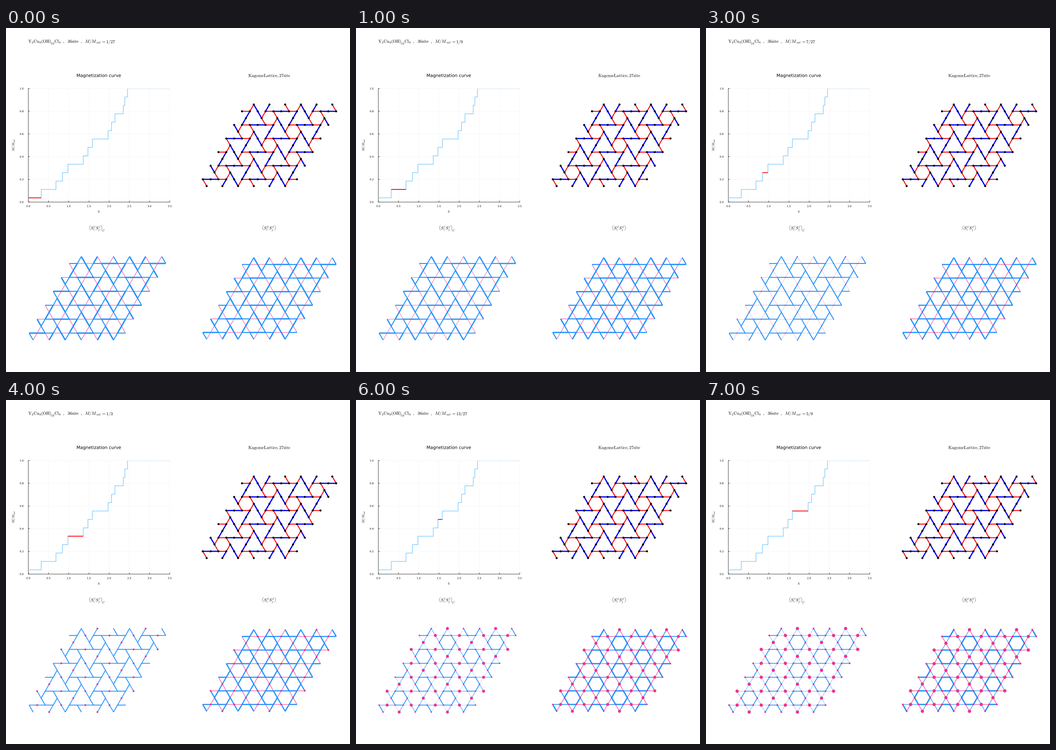
Recreate the animation shown at these times as a matplotlib script. Size 748 by 748 pixels, loop 8 s.

```python
import math
import numpy as np
import matplotlib.pyplot as plt
from matplotlib.animation import FuncAnimation
from matplotlib.collections import LineCollection
from matplotlib.patches import PathPatch, Rectangle
from matplotlib.textpath import TextPath
from matplotlib.transforms import Affine2D

SIZE, DPI = 748, 64
PT = 72 / DPI  # points per pixel
BLUE, PINK = "#1e90ff", "#f0328c"
plt.rcParams["mathtext.fontset"] = "cm"
plt.rcParams["font.family"] = "DejaVu Sans"

fig = plt.figure(figsize=(SIZE / DPI, SIZE / DPI), dpi=DPI, facecolor="white")
ax = fig.add_axes([0, 0, 1, 1])
ax.set_xlim(0, SIZE)
ax.set_ylim(SIZE, 0)
ax.axis("off")


def outline(x, y, s, size=9.5, align=0, turn=0):
    """Text outline; align is 0 left, 0.5 centre, 1 right of x."""
    path = TextPath((0, 0), s, size=size)
    box = path.get_extents()
    shift = -(box.x0 + align * box.width) if align else 0
    place = Affine2D().translate(shift, 0).scale(1, -1).rotate_deg(turn)
    return path.transformed(place.translate(x, y))


def label(*args, **kw):
    patch = PathPatch(outline(*args, **kw), fc="black", lw=0)
    return ax.add_patch(patch)


def line(xs, ys, color, width, **kw):
    return ax.plot(xs, ys, color=color, lw=width * PT, snap=False, **kw)[0]


def lattice():
    """Kagome sites and bonds in units of the bond length, y in half rows.

    Sites are sorted into "bridge" and "ring", bonds into "strong"
    (straight through a bridge site), "hex" (ring to ring) and "weak".
    """
    row = {(j, m): (j + m, 2 * j) for j in range(6) for m in range(13)}
    tip = {(j, k): (0.5 + j + 2 * k, 2 * j - 1) for j in range(7) for k in range(6)}
    sites = {"bridge": [], "ring": []}
    bonds = {"strong": [], "hex": [], "weak": []}
    bridge = {}
    for (j, m), p in row.items():
        if (m + j) % 3 == 1:
            bridge[p] = "\\" if m % 2 == 0 else "-"
    for (j, k), p in tip.items():
        if (k - j) % 3 == 1:
            bridge[p] = "/"
    for p in [*row.values(), *tip.values()]:
        sites["bridge" if p in bridge else "ring"].append(p)

    def add(a, b, way):
        ways = [bridge[p] for p in (a, b) if p in bridge]
        kind = "hex" if not ways else "strong" if way in ways else "weak"
        bonds[kind].append((a, b))

    for (j, m), p in row.items():
        if m < 12:
            add(p, row[j, m + 1], "-")
    for j in range(6):
        for k in range(6):
            low, high = tip[j, k], tip[j + 1, k]
            add(low, row[j, 2 * k], "\\")
            add(low, row[j, 2 * k + 1], "/")
            add(high, row[j, 2 * k + 1], "/")
            add(high, row[j, 2 * k + 2], "\\")
    return sites, bonds


SITES, BONDS = lattice()


class Panel:
    def __init__(self, x, y, step):
        scale = np.array([step, -step * math.sqrt(3) / 2])

        def place(points):
            return np.array([x, y]) + scale * np.array(points)

        self.lines, self.dots = {}, {}
        for kind in ("weak", "hex", "strong"):
            self.lines[kind] = LineCollection(place(BONDS[kind]), zorder=2,
                                              snap=False)
            ax.add_collection(self.lines[kind])
        for kind, points in SITES.items():
            self.dots[kind] = ax.scatter(*place(points).T, s=0, lw=0, zorder=3)

    def bond(self, kind, color, width):
        self.lines[kind].set(color=color, linewidth=width * PT)

    def dot(self, kind, color, radius):
        # one size per dot keeps centres between pixels
        self.dots[kind].set_facecolor(color)
        self.dots[kind].set_sizes(np.full(len(SITES[kind]), (2 * radius * PT) ** 2))

    def correlations(self, grow, **widths):
        """Signed widths: negative is blue, positive is pink."""
        for kind, w in widths.items():
            self.bond(kind, PINK if w > 0 else BLUE, abs(w))
        self.dot("bridge", PINK, 3.6 * grow)
        self.dot("ring", PINK, 2 * grow ** 2)


# Magnetization curve
X0, X1, Y0, Y1 = 48.5, 356, 378.5, 131.7


def px(h):
    return X0 + (X1 - X0) * h / 3.5


def py(m):
    return Y0 + (Y1 - Y0) * m


for i in range(8):
    x = px(i / 2)
    line([x, x], [Y0, Y1], "#f2f2f2", 0.6, zorder=0)
    line([x, x], [Y0, Y0 - 3], "black", 0.7)
    label(x, 389.3, f"{i / 2:.1f}", 5.45, align=0.5)
for i in range(6):
    y = py(i / 5)
    line([X0, X1], [y, y], "#f2f2f2", 0.6, zorder=0)
    line([X0, X0 + 3], [y, y], "black", 0.7)
    label(38, y + 2, f"{i / 5:.1f}", 5.45, align=1)
line([X0, X0], [Y0, Y1], "black", 0.7)
line([X0, X1], [Y0, Y0], "black", 0.7)

# Fields at which the magnetization jumps
JUMPS = [px(h) for h in (0, 0.32, 0.685, 0.845, 0.98, 1.36, 1.475, 1.585,
                         1.975, 2.06, 2.145, 2.35, 2.39, 2.455, 3.5)]
levels = [py((2 * i + 1) / 27) for i in range(14)]
curve = line(np.repeat(JUMPS, 2)[1:-1], np.repeat(levels, 2), "#66c2ff", 1.1,
             zorder=2)
curve.set_clip_path(Rectangle((X0, Y1), X1 - X0, Y0 - Y1, transform=ax.transData))
plateau = line([], [], "red", 1.7, zorder=3, solid_capstyle="butt")

label(202, 106.5, "Magnetization curve", align=0.5)
label(202, 401.5, "$h$", 7.5, align=0.5)
label(18, 255, "$M/M_{sat}$", 7.5, align=0.5, turn=-90)

# Header
label(48.5, 32, r"$\mathrm{Y_3Cu_9(OH)}$")
label(98, 36, r"$\mathrm{19}$", 6.7)
label(105.5, 32, r"$\mathrm{Cl_8}$")
label(124, 32, r"$\mathrm{,}$")
label(134, 32, r"$\mathrm{36site}$")
label(162.5, 32, r"$\mathrm{,}$")
label(172, 32, "$M/M$")
label(196.5, 33.5, "$sat$", 6.7)
label(207.5, 32.5, "$=$")
ratio = label(218, 33, "$1$")

# Panel titles
label(572.5, 106.5, r"$\mathrm{KagomeLattice}{,}\,\mathrm{27site}$", align=0.5)
for x, axis in ((195, "z"), (572, "x")):
    spins = "".join(rf"S_{s}^{{\hat{{{axis}}}}}" for s in "ij")
    label(x, 438, rf"$\langle {spins}\rangle$", align=0.5)
label(209.5, 442.5, "$C$", 6.7)

model = Panel(427.8, 329, 17.07)
model.bond("weak", "#cfe3cf", 0.5)
model.bond("hex", "red", 2)
model.bond("strong", "blue", 2.6)
model.dot("bridge", "black", 2.2)
model.dot("ring", "black", 2.2)

left = Panel(50.2, 663.4, 17.48)
right = Panel(427.8, 662, 17.07)


def draw(i):
    n = 2 * i + 1
    g = math.gcd(n, 27)
    ratio.set_path(outline(218, 33, rf"$\mathrm{{{n // g}/{27 // g}}}$"))
    plateau.set_data(JUMPS[i:i + 2], [levels[i]] * 2)
    grow = math.sin(math.pi * i / 15) ** 2
    left.correlations(grow, strong=0.33 * i - 2.9, hex=0.06 * i - 2,
                      weak=0.95 - 0.21 * i)
    right.correlations(grow, strong=0.033 * i ** 2 - 2.8, hex=-2.1 - 0.1 * i,
                       weak=0.9 + 0.03 * i)
    return ()


anim = FuncAnimation(fig, draw, frames=8, interval=1000, repeat=True,
                     repeat_delay=0, blit=False)
plt.show()
```
